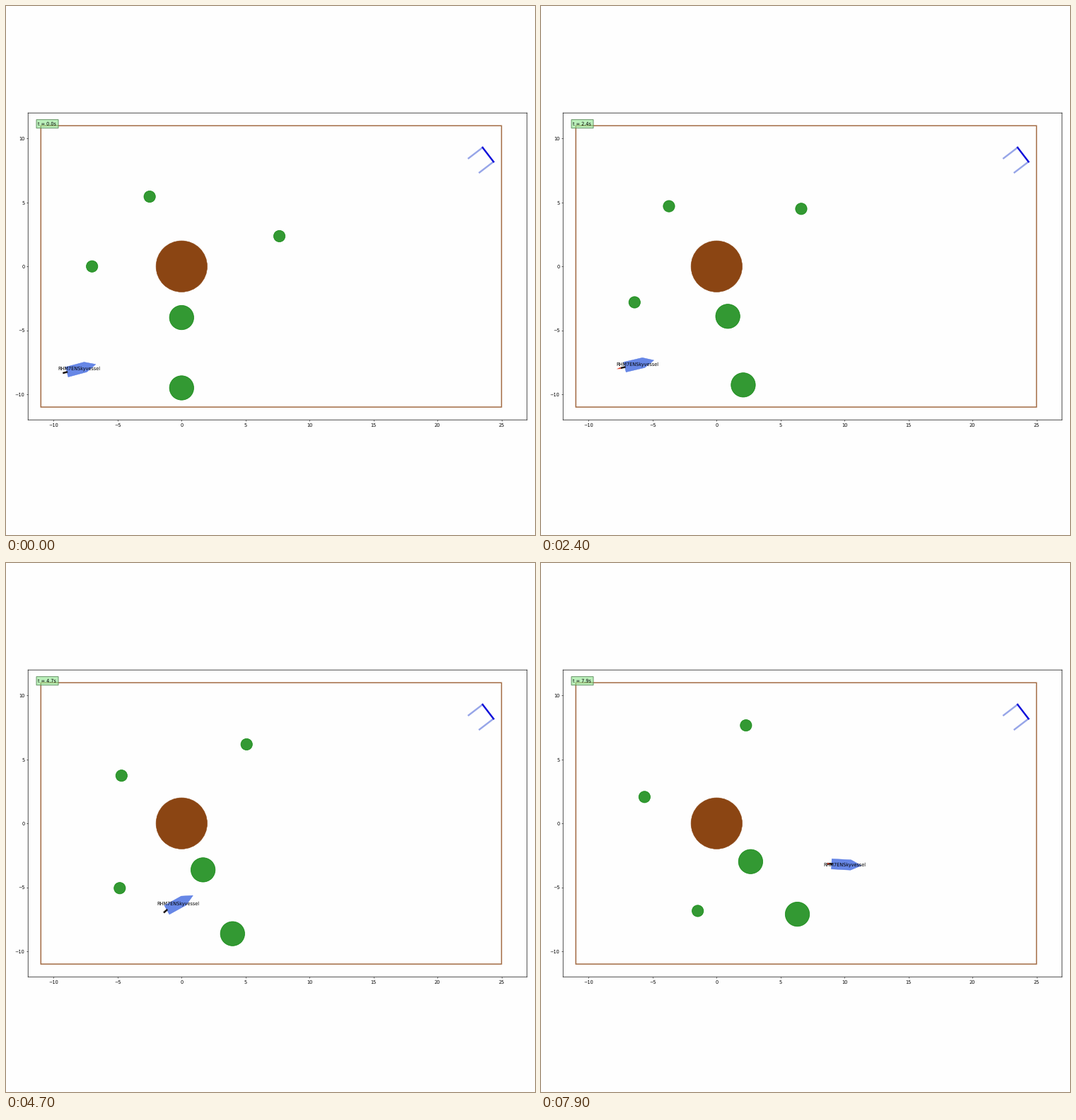
A matplotlib script that plays this animation: 748 px wide and 748 px high, repeating every 8 s.

```python
import numpy as np
import matplotlib.pyplot as plt
from matplotlib.animation import FuncAnimation
from matplotlib.patches import Circle, Polygon, Rectangle

SIZE, DPI = 748, 88
FRAMES, STEP_MS = 80, 100
PX = 72 / DPI            # points per pixel
FONT = 6.5 * PX
PAPER = "#fefefe"

# unhinted glyphs keep their true size at this small scale
plt.rcParams.update({"font.family": "DejaVu Sans", "text.hinting": "no_hinting"})

# orbit radius, start angle, angular speed, moon radius
MOONS = [
    (4.0, -np.pi / 2, 0.092, 0.95),
    (9.5, -np.pi / 2, 0.092, 0.95),
    (7.0, np.pi, 0.172, 0.45),
    (6.0, 2.0, 0.100, 0.45),
    (8.0, 0.3, 0.124, 0.45),
]

# the ship speeds up, coasts, then brakes
START, COAST, BRAKE = 0.25, 4.7, 6.3
PUSH, PULL = 0.78, 0.66


def since(t, start):
    return max(t - start, 0)


def accel(t):
    if START < t < COAST:
        return PUSH
    return -PULL if t > BRAKE else 0


def position(t):
    d = (PUSH * (since(t, START)**2 - since(t, COAST)**2)
         - PULL * since(t, BRAKE)**2) / 2
    return d - 8, -8 + 0.19 * d + 0.0042 * d**2


def heading(t):
    """Dip slightly, swing up between the moons, then turn away faster and faster."""
    u = np.clip((t - 3.1) / (COAST - 3.1), 0, 1)
    deg = (15 - 3 * np.sin(np.pi * min(t, 3) / 3)
           + 14 * u * u * (3 - 2 * u) - 5 * since(t, COAST)**1.6)
    return np.radians(deg)


def gimbal(t):
    return np.radians(14 * np.exp(-((t - 5) / 0.8)**2))


def place(points, angle, origin):
    c, s = np.cos(angle), np.sin(angle)
    return np.asarray(points) @ np.array([[c, s], [-s, c]]) + origin


fig = plt.figure(figsize=(SIZE / DPI, SIZE / DPI), dpi=DPI, facecolor=PAPER)
left, right, top, bottom = 31.2, 736.8, 151.2, 585.2
ax = fig.add_axes([left / SIZE, 1 - bottom / SIZE,
                   (right - left) / SIZE, (bottom - top) / SIZE], facecolor=PAPER)
ax.set(xlim=(-12, 27), ylim=(-12, 12),
       xticks=range(-10, 26, 5), yticks=range(-10, 11, 5))
ax.tick_params(labelsize=FONT, length=2.3 * PX, width=0.6 * PX, pad=2.4 * PX)
for spine in ax.spines.values():
    spine.set(linewidth=0.7 * PX, snap=False)

# arena, planet and dock
ax.add_patch(Rectangle((-11, -11), 36, 22, fill=False, ec="saddlebrown", lw=1.5 * PX,
                       alpha=0.8, snap=False, zorder=2))
ax.add_patch(Circle((0, 0), 2, fc="saddlebrown", ec="saddlebrown", lw=0.6 * PX, zorder=2))
dock = place([(-1.38, 0.7), (0, 0.7), (0, -0.7), (-1.38, -0.7)],
             np.radians(37.5), (23.95, 8.74))
for side in (dock[:2], dock[2:]):
    ax.plot(*side.T, color="#96a5e8", lw=2.4 * PX, zorder=2)
ax.plot(*dock[1:3].T, color="#0808da", lw=2.4 * PX, zorder=3)

moons = [ax.add_patch(Circle((0, 0), m[3], fc="green", ec="green",
                             lw=0.8 * PX, alpha=0.8, zorder=3)) for m in MOONS]


def shape(color, z, **kw):
    return ax.add_patch(Polygon(np.zeros((3, 2)), closed=True, fc=color, zorder=z, **kw))


HULL = [(-1, -0.4), (-1, 0.4), (0.5, 0.4), (1.33, 0), (0.5, -0.4)]
NOZZLE = [(0.06, -0.07), (0.06, 0.07), (-0.33, 0.07), (-0.33, -0.07)]

hull = shape("royalblue", 4, ec="royalblue", lw=0.5 * PX, alpha=0.8)
nozzle = shape("#1c1614", 5, lw=0)
flame = shape("#e0402c", 6, lw=0)
label = ax.text(0, 0, "RHM7ENSkyvessel", size=FONT, ha="center", va="center", zorder=8)

# clock, placed in pixels
ax.add_patch(Rectangle((43 / SIZE, 1 - 172.7 / SIZE), 31 / SIZE, 12 / SIZE,
                       transform=fig.transFigure, clip_on=False, snap=False,
                       fc=(0.56, 0.91, 0.56, 0.6), ec="#5c8a5c", lw=0.9 * PX, zorder=9))
clock = fig.text(45.4 / SIZE, 1 - 169.1 / SIZE, "", size=FONT, va="baseline")


def draw(i):
    t = i * STEP_MS / 1000
    for moon, (r, start, speed, _) in zip(moons, MOONS):
        a = start + speed * t
        moon.center = r * np.cos(a), r * np.sin(a)

    spot, angle = position(t), heading(t)
    hull.set_xy(place(HULL, angle, spot))
    label.set_position(spot)

    tail = place([(-1, 0)], angle, spot)[0]
    aim = angle + gimbal(t)
    nozzle.set_xy(place(NOZZLE, aim, tail))
    tip = -0.33 - 0.43 * accel(t)
    flame.set_xy(place([(-0.33, -0.07), (-0.33, 0.07), (tip, 0)], aim, tail))

    clock.set_text(f"t = {t:.1f}s")
    return [*moons, hull, nozzle, flame, label, clock]


anim = FuncAnimation(fig, draw, frames=FRAMES, interval=STEP_MS,
                     repeat=True, repeat_delay=0, blit=False)
plt.show()
```
